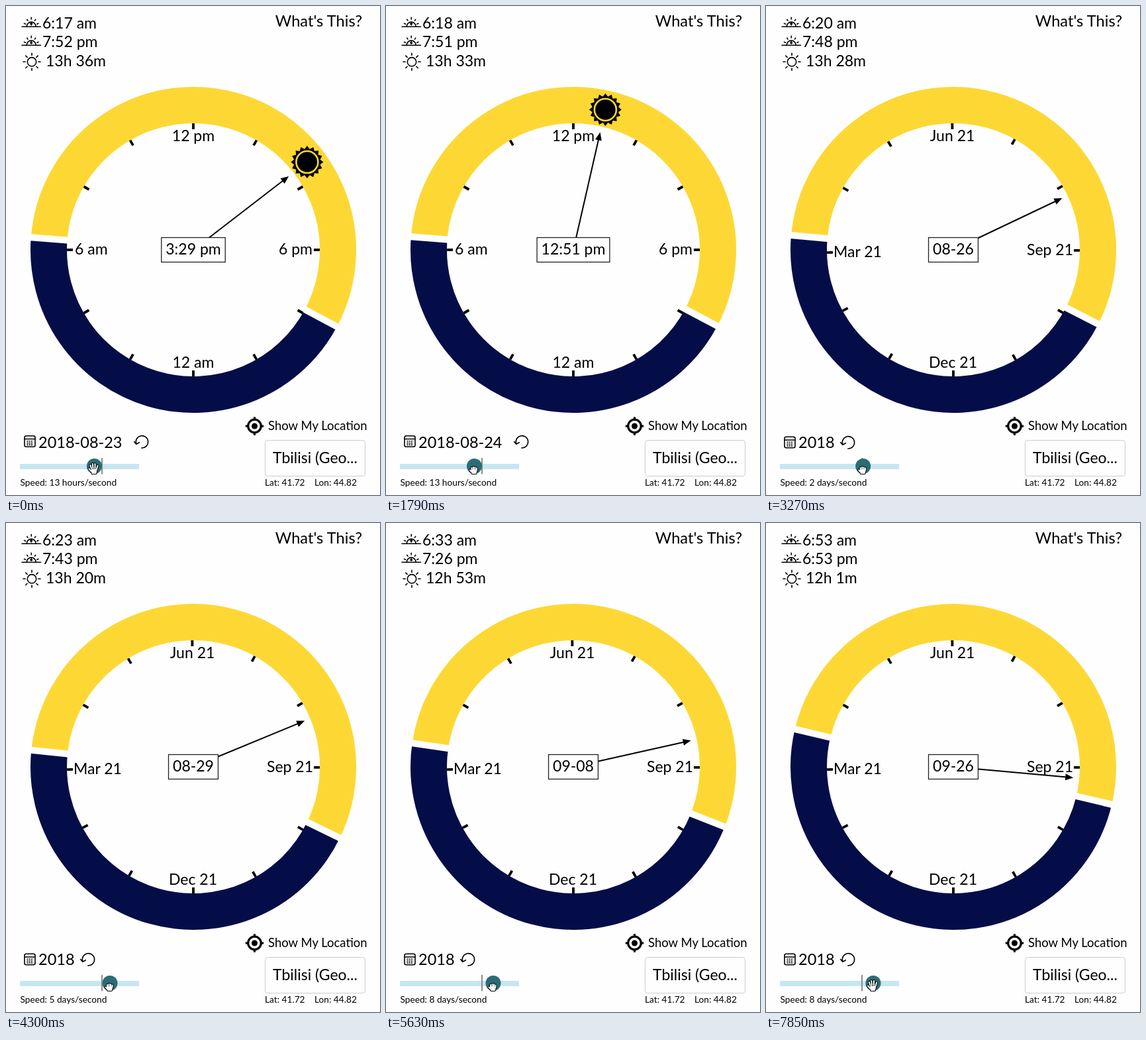
Write an HTML page that moves like this. It is 565 px wide and 738 px high and loops after 8000 ms.

```html
<!DOCTYPE html>
<html lang="en">
<head>
<meta charset="utf-8">
<title>Daylight clock</title>
<style>
  html, body { margin: 0; width: 100%; height: 100%; overflow: hidden; background: #fefefe; }
  svg { display: block; width: 565px; height: 738px; }
  text { font: 23px Lato, "Open Sans", sans-serif; fill: #000; }
  .mid { text-anchor: middle; }
  .end { text-anchor: end; }
  .date { font-size: 23.5px; }
  .small { font-size: 13.7px; }
  .line { fill: none; stroke: #000; stroke-width: 1.6; stroke-linecap: round; stroke-linejoin: round; }
</style>
</head>
<body>
<svg viewBox="0 0 565 738">
  <defs>
    <g id="horizon" class="line">
      <path d="M24 31.3H52.500M31.300 31a6.900 6.900 0 0 1 13.800 0"/>
      <path d="M27.500 26.300l2 1M31.700 20.300l1.300 1.800M38.200 17.300v2.700M44.700 20.300l-1.300 1.800M48.900 26.300l-2 1"/>
    </g>
  </defs>

  <use href="#horizon"/>
  <path class="line" d="M38.2 29v-3.500m-1.500 1.500l1.500-1.500l1.500 1.500"/>
  <use href="#horizon" y="28"/>
  <path class="line" d="M38.2 53.500v3.500m-1.500-1.500l1.500 1.500l1.500-1.500"/>
  <g id="sunIcon" class="line"><circle cx="39" cy="84.3" r="6.7"/></g>
  <text id="rise" x="55" y="34"/>
  <text id="set" x="55" y="62"/>
  <text id="length" x="60" y="91"/>
  <text class="end" x="538" y="31" style="font-size:23.7px">What's This?</text>

  <g fill="none" stroke-width="55">
    <path id="night" stroke="#040d47"/>
    <path id="day" stroke="#fdd835"/>
  </g>
  <path id="gaps" stroke="#fefefe" stroke-width="10"/>

  <g id="clockFace">
    <text class="mid" x="283" y="204">12 pm</text>
    <text class="end" x="463" y="375">6 pm</text>
    <text class="mid" x="283" y="546">12 am</text>
    <text x="104" y="375">6 am</text>
  </g>
  <g id="yearFace">
    <text class="mid" x="281.5" y="204">Jun 21</text>
    <text class="end" x="464" y="376">Sep 21</text>
    <text class="mid" x="282.5" y="546">Dec 21</text>
    <text x="102" y="379">Mar 21</text>
  </g>

  <g id="sun">
    <path id="rays"/>
    <circle r="16.5" stroke="#fdd835" stroke-width="2.6"/>
  </g>
  <g id="hand">
    <path d="M0 0V-172" stroke="#000" stroke-width="2"/>
    <path d="M0-182l5 12h-10z"/>
  </g>
  <rect id="box" y="349.5" height="37" fill="#fefefe" stroke="#222" stroke-width="1.3"/>
  <text id="now" class="mid" x="283" y="375"/>

  <g id="calendar" class="line">
    <rect x="28" y="648.8" width="16" height="16.4" rx="2.5"/>
    <path d="M28 653.5h16"/>
    <path stroke-linecap="butt" stroke-dasharray="2 1.2" d="M31.5 656.8h9.4M31.5 659.6h9.4M31.5 662.4h9.4"/>
  </g>
  <text id="date" class="date" x="49" y="667"/>
  <path id="undo" class="line" d="M196.8 661a9.200 9.200 0 1 1 8 6M193.600 657.500l3.200 3.700l4.500-2.500"/>

  <rect x="21" y="691" width="180" height="8" fill="#c6e6f1"/>
  <path d="M145 682v24.500" stroke="#8c8c8c" stroke-width="2"/>
  <g id="knob">
    <circle r="11.5" fill="#2a6d76"/>
    <g id="openHand" transform="translate(-1 3.5)"/>
    <g id="fist" transform="translate(-1 5)"/>
  </g>
  <text id="speed" class="small" x="21.5" y="724"/>

  <g fill="none" stroke="#000" stroke-width="3.2">
    <circle cx="375.5" cy="634" r="9.8"/>
    <path d="M375.5 620.300v5M375.500 642.700v5M361.800 634h5M384.200 634h5"/>
    <circle cx="375.5" cy="634" r="4.5" fill="#000" stroke="none"/>
  </g>
  <text x="396" y="640" style="font-size:18.5px">Show My Location</text>
  <rect x="391.5" y="655.5" width="151" height="54" rx="4" fill="#fefefe" stroke="#ccc"/>
  <text x="403" y="690">Tbilisi (Geo...</text>
  <text class="small" x="391" y="724">Lat: 41.72</text>
  <text class="small" x="466" y="724">Lon: 44.82</text>
</svg>
<script>
const $ = id => document.getElementById(id);
const CX = 283, CY = 368, RING = 218.5, DAY = 864e5, LOOP = 8000;
const START = Date.UTC(2018, 7, 23), FIRST = 0.6455;

// Slider drag: time in ms, knob x
const DRAG = [[0, 133.46], [1821.3, 133.46], [2221.3, 140], [2700, 140],
  [4150, 157], [4500, 157], [4700, 162], [8000, 162]];
// Days since the start date, minutes of sunrise after 6, sunset after 18, day length
const SUN = [[0, 17, 112, 816], [1, 18, 111, 813], [2, 19, 109, 810], [6, 23, 103, 800],
  [16, 33, 86, 773], [24, 42, 71, 748], [34, 53, 53, 721]];

const at = (deg, r) => {
  const a = deg * Math.PI / 180;
  return (CX + r * Math.sin(a)).toFixed(2) + ' ' + (CY - r * Math.cos(a)).toFixed(2);
};
const show = (id, on) => $(id).setAttribute('visibility', on ? 'visible' : 'hidden');
const move = (id, x, y) => $(id).setAttribute('transform', `translate(${x} ${y})`);
const put = (id, s) => { if ($(id).textContent !== s) $(id).textContent = s; };
const pad = n => String(n).padStart(2, '0');

function lerpRow(rows, x) {
  let i = 1;
  while (i < rows.length - 1 && x > rows[i][0]) i++;
  const a = rows[i - 1], b = rows[i], f = (x - a[0]) / (b[0] - a[0]);
  return a.map((v, j) => v + (b[j] - v) * f);
}

// Days per second grow exponentially along the slider
const rate = x => Math.exp((x - 140) / 10.6);

function daysAt(t) {
  let sum = FIRST;
  for (let i = 1; i < DRAG.length && t > DRAG[i - 1][0]; i++) {
    const t0 = DRAG[i - 1][0], x0 = DRAG[i - 1][1];
    const t1 = Math.min(t, DRAG[i][0]), x1 = lerpRow(DRAG, t1)[1];
    const v0 = rate(x0), v1 = rate(x1);
    const mean = Math.abs(x1 - x0) < 1e-6 ? v0 : (v1 - v0) * 10.6 / (x1 - x0);
    sum += mean * (t1 - t0) / 1000;
  }
  return sum;
}

function clockText(min) {
  const h = Math.floor(min / 60) % 24;
  return `${h % 12 || 12}:${pad(Math.floor(min % 60))} ${h < 12 ? 'am' : 'pm'}`;
}

function speedText(v) {
  const day = v > 0.97, n = Math.round(day ? v : v * 24);
  return `Speed: ${n} ${day ? 'day' : 'hour'}${n > 1 ? 's' : ''}/second`;
}

// Angle of a date on the year face; Dec 21 is at the bottom
const yearAngle = ms => 180 + (ms - Date.UTC(2017, 11, 21)) / DAY * 360 / 365;

// Ring slice in two halves, so that neither reaches 180 degrees
function slice(a0, a1) {
  const arc = a => `A${RING} ${RING} 0 0 1 ${at(a, RING)}`;
  return `M${at(a0, RING)}${arc((a0 + a1) / 2)}${arc(a1)}`;
}

function addPath(parent, d, attrs) {
  const p = document.createElementNS('http://www.w3.org/2000/svg', 'path');
  p.setAttribute('d', d);
  for (const k in attrs) p.setAttribute(k, attrs[k]);
  $(parent).append(p);
}

function build() {
  for (let i = 0; i < 12; i++) {
    const tick = (face, a) =>
      addPath(face, `M${at(a, 191)}L${at(a, 182)}`, { stroke: '#000', 'stroke-width': 3.8 });
    tick('clockFace', i * 30);
    tick('yearFace', yearAngle(Date.UTC(2018, i, 21)));
  }
  let rays = '', star = '';
  for (let i = 0; i < 8; i++) {
    const c = Math.cos(i * Math.PI / 4), s = Math.sin(i * Math.PI / 4);
    rays += `M${39 + 9.8 * c} ${84.3 + 9.8 * s}L${39 + 13 * c} ${84.3 + 13 * s}`;
  }
  addPath('sunIcon', rays, {});
  for (let i = 0; i < 32; i++) {
    const r = i % 2 ? 20 : 24.5, a = i * Math.PI / 16;
    star += (i ? 'L' : 'M') + r * Math.cos(a) + ' ' + r * Math.sin(a);
  }
  $('rays').setAttribute('d', star + 'z');

  const hands = {
    openHand: 'M-3.5 0L-5-5M-1 0L-1.6-7M2 0L2-7M4.5 1L6-4.5M-4 4L-7 .5M-3 2H4L3 7H-2z',
    fist: 'M-3 0V-2.5M-.5 0V-3.5M2 0V-3.3M4.5 1V-2M-4 3L-5.5 1M-3 1H4L3 5.5H-2z'
  };
  for (const id in hands)
    for (const [color, w] of [['#000', 4], ['#fff', 2]])
      addPath(id, hands[id], { fill: color, stroke: color, 'stroke-width': w,
        'stroke-linecap': 'round', 'stroke-linejoin': 'round' });
}

function draw(t) {
  const x = lerpRow(DRAG, t)[1], days = daysAt(t), n = Math.floor(days);
  const yearly = x > 145, minute = (days - n) * 1440;
  const [, rise, set, len] = lerpRow(SUN, n).map(Math.round);
  const iso = new Date(START + n * DAY).toISOString();

  put('rise', clockText(360 + rise));
  put('set', clockText(1080 + set));
  put('length', `${Math.floor(len / 60)}h ${len % 60}m`);

  // The shown minutes are rounded down, so aim at their middle
  const a0 = (rise + 0.5) / 4 - 90, a1 = (set + 0.5) / 4 + 90;
  $('day').setAttribute('d', slice(a0, a1));
  $('night').setAttribute('d', slice(a1, a0 + 360));
  $('gaps').setAttribute('d', [a0, a1].map(a => `M${at(a, 188)}L${at(a, 249)}`).join(''));

  const angle = yearly ? yearAngle(START + n * DAY) : minute / 4 - 180;
  $('hand').setAttribute('transform', `translate(${CX} ${CY}) rotate(${angle})`);
  show('sun', !yearly && minute > 360 + rise && minute < 1080 + set);
  $('sun').setAttribute('transform', `translate(${at(angle, 217)})`);
  show('clockFace', !yearly);
  show('yearFace', yearly);

  put('now', yearly ? iso.slice(5, 10) : clockText(minute));
  const w = $('now').getComputedTextLength() + 13;
  $('box').setAttribute('x', CX - w / 2);
  $('box').setAttribute('width', w);

  put('date', iso.slice(0, yearly ? 4 : 10));
  move('calendar', 0, yearly ? 1.5 : 0);
  move('undo', yearly ? -81 : 0, yearly ? 1 : 0);
  put('speed', speedText(rate(x)));
  move('knob', x, 694.5);
  const held = t > 500 && t < 6300;
  show('fist', held);
  show('openHand', !held);
}

// The picture advances in steps of 140 to 150 ms
const stepStart = k => 150 * k - 10 * Math.min(10, Math.max(0, Math.floor(0.3 * k - 3.48)));

function tick() {
  const t = (performance.now() - begin) % LOOP;
  let k = 0;
  while (k < 53 && stepStart(k + 1) <= t) k++;
  if (k !== shown) draw(stepStart(shown = k));
  requestAnimationFrame(tick);
}

build();
let shown = -1;
const begin = performance.now();
tick();
</script>
</body>
</html>
```
